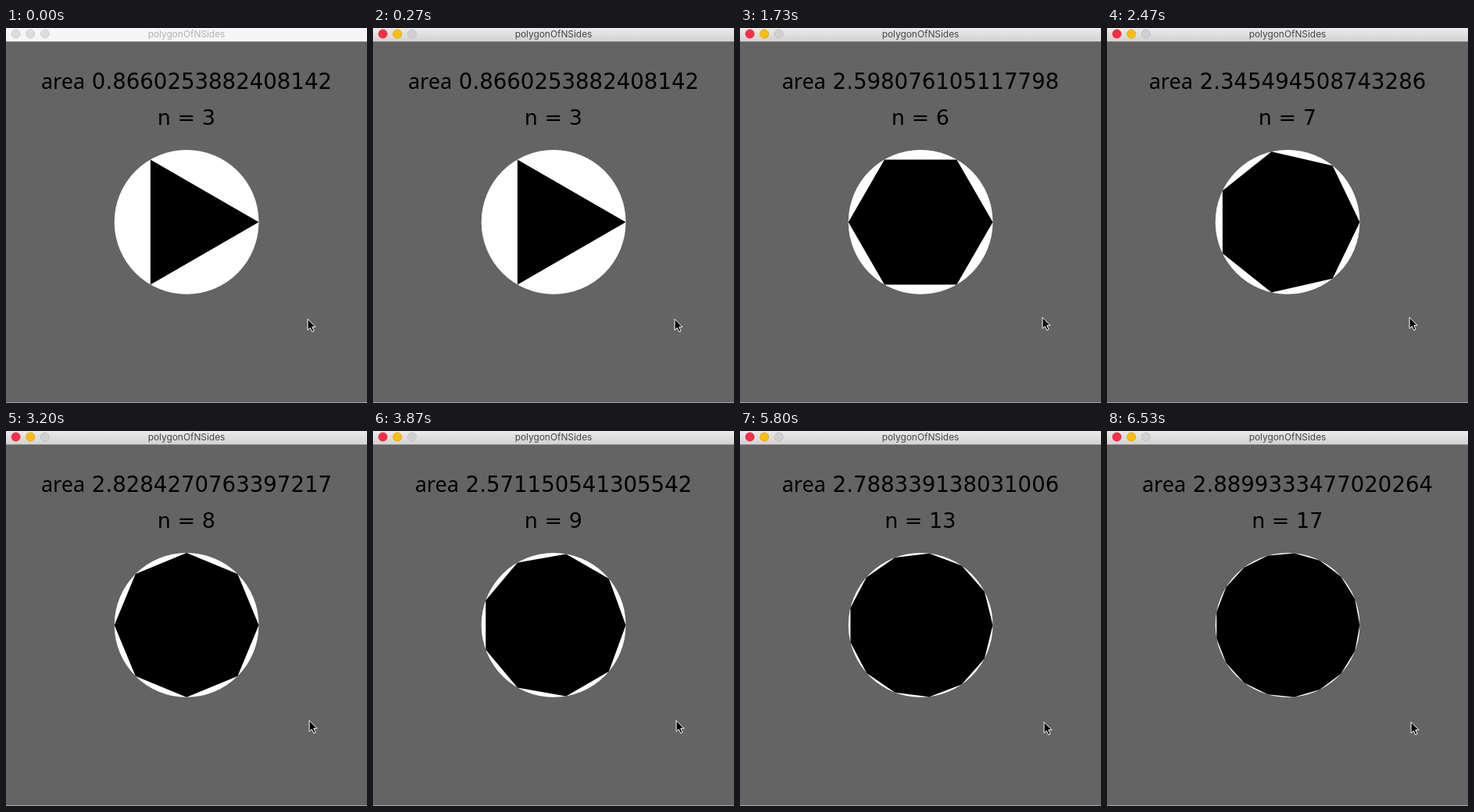
Animation of 462 by 480 pixels, one loop 6590 ms. Source, as an HTML page:

```html
<!DOCTYPE html>
<html lang="en">
<head>
<meta charset="utf-8">
<title>polygonOfNSides</title>
<style>
  html, body { margin: 0; width: 100%; height: 100%; overflow: hidden; background: #646464; }
  svg { display: block; width: 462px; height: 480px; }
  text { text-anchor: middle; }
  .label { font: 27.6px "DejaVu Sans", sans-serif; }
  .word { font: 27px "Noto Sans", "Open Sans", sans-serif; }
  #count { font-size: 27px; }
  #title { font: 11.9px Inter, Roboto, sans-serif; fill: #b2b2b2; }
  #bar { fill: #f6f6f6; }
  .dot { fill: #dcdcdc; stroke: #cbcbcb; stroke-width: .8; }
  .active #title { fill: #474747; }
  .active #bar { fill: url(#shade); }
  .active .close { fill: #fc2f45; stroke: #e02336; }
  .active .mini { fill: #fdbd0b; stroke: #e0a30a; }
  .active .zoom { fill: #d0d0d0; stroke: #bcbcbc; }
</style>
</head>
<body>
<svg id="stage" viewBox="0 0 462 480">
  <defs>
    <linearGradient id="shade" x2="0" y2="1">
      <stop stop-color="#ebebeb"/>
      <stop offset="1" stop-color="#d2d2d2"/>
    </linearGradient>
  </defs>
  <rect width="462" height="480" fill="#646464"/>
  <rect id="bar" width="462" height="17.3"/>
  <rect y="479" width="462" height="1" fill="#a8a8a8"/>
  <circle class="dot close" cx="12.6" cy="7.5" r="5.5"/>
  <circle class="dot mini" cx="31.2" cy="7.5" r="5.5"/>
  <circle class="dot zoom" cx="49.8" cy="7.5" r="5.5"/>
  <text id="title" x="231" y="12">polygonOfNSides</text>

  <text class="label" x="231" y="78" xml:space="preserve"><tspan class="word">area</tspan><tspan id="area"></tspan></text>
  <text class="label" id="count" x="230.8" y="124"></text>

  <circle cx="231.1" cy="248.4" r="92.4" fill="#fff"/>
  <polygon id="shape"/>
  <path id="cursor" d="M.6 1V15.2L3.8 12.2L6.3 17.4L8.6 16.4L6.3 11.2H10.6Z" stroke="#fff" stroke-width="1"/>
</svg>
<script>
  const LOOP = 6590, CX = 231.1, CY = 248.4, R = 92.4;
  const FIRST = 3;
  // Each press adds one side.
  const presses = [670, 1000, 1730, 2470, 3200, 3870, 4530, 5130,
                   5670, 5800, 6000, 6130, 6330, 6470];
  // time, x, y of the pointer
  const moves = [[0, 385.5, 371.5], [670, 386.5, 369.5], [3000, 387.5, 369.5],
                 [3670, 387.5, 367.5], [3730, 387.5, 369.5], [5530, 388.5, 371.5]];
  const el = id => document.getElementById(id);
  let shown = 0;

  function areaText(n) {
    const area = Math.fround(Math.floor(n / 2) * Math.sin(2 * Math.PI / n));
    return Number.isInteger(area) ? area.toFixed(1) : String(area);
  }

  function showPolygon(n) {
    const points = Array.from({ length: n }, (_, i) => {
      const a = 2 * Math.PI * i / n;
      return (CX + R * Math.cos(a)).toFixed(2) + "," + (CY + R * Math.sin(a)).toFixed(2);
    });
    el("shape").setAttribute("points", points.join(" "));
    el("area").textContent = " " + areaText(n);
    el("count").textContent = "n = " + n;
    shown = n;
  }

  function draw(t) {
    const n = FIRST + presses.filter(p => p <= t).length;
    if (n !== shown) showPolygon(n);
    el("stage").classList.toggle("active", t >= 200);
    const [, x, y] = moves.filter(m => m[0] <= t).pop();
    el("cursor").setAttribute("transform", `translate(${x} ${y})`);
  }

  const start = performance.now();
  function tick() {
    draw((performance.now() - start) % LOOP);
    requestAnimationFrame(tick);
  }
  tick();
</script>
</body>
</html>
```
